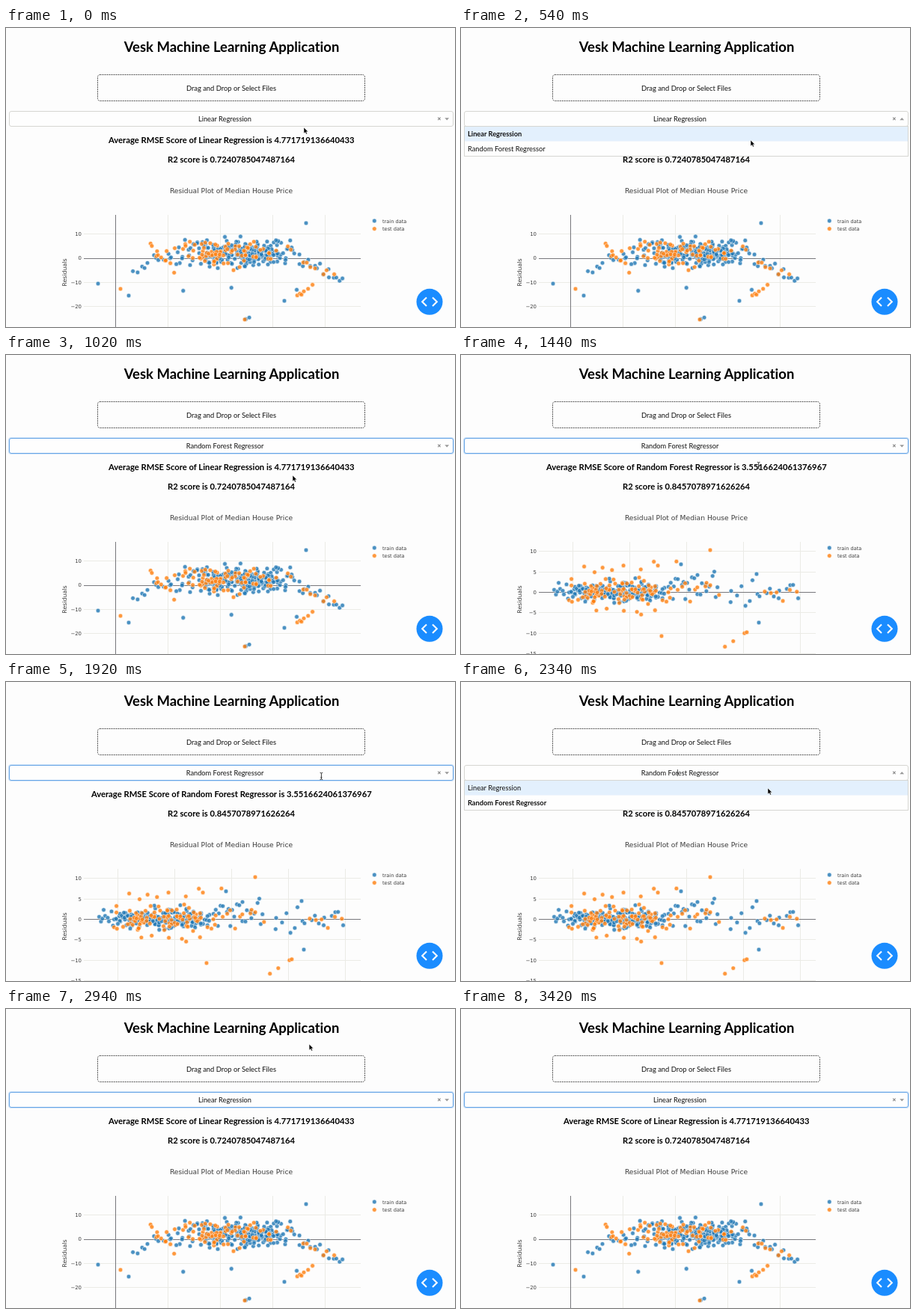
An HTML page that plays this animation: 600x400 px, repeating every 3480 ms.

```html
<!DOCTYPE html>
<html lang="en">
<head>
<meta charset="utf-8">
<title>Regression dashboard</title>
<style>
  html, body { margin: 0; width: 100%; height: 100%; overflow: hidden; background: #fdfdfd; }
  svg { display: block; width: 600px; height: 400px; }
  text { font: 9.25px Lato, sans-serif; font-variant-ligatures: none; fill: #111; }
  .mid { text-anchor: middle; }
  .bold { font-weight: 700; }
  .head { font-size: 18.5px; fill: #000; }
  .drop { font-size: 9.4px; }
  .score { font-size: 11.25px; fill: #000; }
  .plot text { font: 6.9px "DejaVu Sans", sans-serif; fill: #3c3c3c; }
  .plot .title { font-size: 9.2px; }
  .plot .axis { font-size: 7.9px; }
  .plot .key { font-size: 6.6px; }
  .tick { text-anchor: end; }
  .grid { stroke: #ebebe6; }
  .zero { stroke: #77777c; }
  .train { fill: #1f77b4; }
  .test { fill: #ff7f0e; }
  .plot circle { opacity: .8; stroke: #fff; stroke-width: .6; }
</style>
</head>
<body>
<svg viewBox="0 0 600 400">
  <defs><clipPath id="area"><rect x="104" y="250" width="370" height="150"/></clipPath></defs>
  <rect width="600" height="400" fill="#fdfdfd"/>

  <text class="mid bold head" x="301.5" y="32">Vesk Machine Learning Application</text>
  <rect x="122.5" y="62.5" width="357" height="35" rx="3" fill="none" stroke="#555" stroke-dasharray="2 1"/>
  <text class="mid drop" x="301" y="84">Drag and Drop or Select Files</text>

  <text class="mid bold score" id="rmse" x="301.3" y="154"></text>
  <text class="mid bold score" id="r2" x="301" y="179.5"></text>

  <g class="plot">
    <text class="mid title" x="301" y="221">Residual Plot of Median House Price</text>
    <text class="mid axis" transform="translate(81 327) rotate(-90)">Residuals</text>
    <g id="linear"></g>
    <g id="forest"></g>
    <circle class="train" cx="492.3" cy="258" r="2.9"/>
    <circle class="test" cx="492.3" cy="268.6" r="2.9"/>
    <text class="key" x="503" y="260.6">train data</text>
    <text class="key" x="503" y="271.2">test data</text>
  </g>

  <circle cx="566" cy="366.3" r="17.5" fill="#1a8cff"/>
  <path d="M562 360.6l-5.8 5.7 5.8 5.7M570 360.6l5.8 5.7-5.8 5.7" fill="none" stroke="#fff" stroke-width="2.1"/>

  <rect id="glow" x="4" y="111" width="594" height="21" rx="3" fill="none" stroke="#cfe3f8" stroke-width="2"/>
  <rect id="control" x="4.5" y="111.5" width="593" height="20" rx="2.5" fill="#fefefe"/>
  <text class="mid" id="choice" x="292.5" y="124.8"></text>
  <path d="M577.2 119.7l3.4 3.4m0-3.4l-3.4 3.4" stroke="#888" stroke-width="1.1"/>
  <path id="arrow" fill="#999"/>
  <g id="menu">
    <rect x="4.5" y="131.5" width="593" height="40" fill="#fefefe" stroke="#d6d6d2"/>
    <rect id="hover" x="5" width="592" height="19.5" fill="#e3f0fd"/>
    <text id="optLinear" x="9" y="145.3">Linear Regression</text>
    <text id="optForest" x="9" y="165.2">Random Forest Regressor</text>
  </g>
  <path id="caret" d="M289.5 117v9" stroke="#333" stroke-width=".8"/>

  <g id="pointer">
    <path id="tip" d="M0 0V8.1L1.9 6.4 3.1 9.1 4.5 8.5 3.3 5.8H5.7Z" fill="#000" stroke="#fff" stroke-width=".5"/>
    <path id="beam" d="M-1.8 -4.5Q0 -4.5 0 -3.3Q0 -4.5 1.8 -4.5M0 -3.3V3.5M-1.8 4.7Q0 4.7 0 3.5Q0 4.7 1.8 4.7M-1 1.8H1" fill="none" stroke="#222" stroke-width=".9"/>
  </g>
</svg>
<script>
const LOOP = 3480, STEP = 60;
const $ = id => document.getElementById(id);
const set = (node, attrs) => {
  for (const k in attrs) node.setAttribute(k, attrs[k]);
  return node;
};
const add = (parent, tag, attrs) =>
  parent.appendChild(set(document.createElementNS('http://www.w3.org/2000/svg', tag), attrs));
const show = (id, on) => { $(id).style.display = on ? '' : 'none'; };

let seed = 7;
function rnd() {
  seed = seed + 0x6D2B79F5 | 0;
  let v = Math.imul(seed ^ seed >>> 15, 1 | seed);
  v = v + Math.imul(v ^ v >>> 7, 61 | v) ^ v;
  return ((v ^ v >>> 14) >>> 0) / 4294967296;
}
const gauss = () => (rnd() + rnd() + rnd() - 1.5) * 2;
const many = (n, make) => Array.from({ length: n }, (_, i) => make(i));

// Round cloud, band of scattered points along a line, single point.
const bell = (n, x, y, sx, sy) => many(n, () => [x + gauss() * sx, y + gauss() * sy]);
const trail = (n, x0, y0, x1, y1, spread) => many(n, i => {
  const u = (i + rnd()) / n;
  return [x0 + (x1 - x0) * u, y0 + (y1 - y0) * u + gauss() * spread];
});
const dot = (x, y) => [[x, y]];

const plots = {
  linear: {
    left: 217, colGap: 70, zero: 308, rowGap: 32.4, unit: 10, top: 10, axis: 146,
    train: [
      bell(155, 296, 301, 32, 8.5), bell(70, 348, 299, 22, 8.5),
      trail(14, 168, 326, 238, 304, 6), trail(16, 385, 309, 452, 336, 6),
      trail(3, 220, 349, 400, 350, 3), trail(2, 314, 391, 330, 385, 1),
      dot(123, 342), dot(164, 358), dot(372, 365), dot(401, 261)
    ],
    test: [
      bell(80, 300, 301, 36, 8.5), trail(9, 190, 301, 225, 315, 9),
      trail(6, 385, 360, 411, 345, 1), trail(7, 390, 303, 442, 336, 4),
      dot(153, 349), dot(319, 390)
    ]
  },
  forest: {
    left: 150, colGap: 76, zero: 317.5, rowGap: 27.3, unit: 5, top: 10,
    train: [
      bell(85, 186, 317, 17, 5), bell(100, 236, 317, 18, 6.5),
      trail(20, 123, 315, 170, 317, 5), trail(24, 275, 313, 345, 313, 11),
      trail(18, 355, 308, 452, 324, 11),
      dot(294, 280), dot(395, 293), dot(398, 358)
    ],
    test: [
      bell(42, 183, 317, 17, 8), bell(48, 240, 317, 18, 8.5),
      trail(10, 142, 296, 290, 282, 6), trail(6, 170, 342, 272, 342, 2),
      trail(10, 285, 309, 345, 313, 9), trail(6, 400, 316, 450, 324, 12),
      trail(4, 348, 393, 390, 365, 1),
      dot(333, 261), dot(268, 376)
    ]
  }
};

function drawPlot(name) {
  const p = plots[name], root = $(name);
  const line = (d, cls) => add(root, 'path', { d, class: cls });

  for (let x = p.left; x < 474; x += p.colGap) line(`M${x - .5} 250V400`, 'grid');
  for (let v = p.top; ; v -= p.unit) {
    const y = p.zero - v / p.unit * p.rowGap;
    if (y > 400) break;
    line(`M104 ${Math.floor(y) + .5}H474`, v ? 'grid' : 'zero');
    add(root, 'text', { class: 'tick', x: 101, y: y + 2.4 }).textContent = String(v).replace('-', '−');
  }
  if (p.axis) line(`M${p.axis + .5} 250V400`, 'zero');

  const dots = add(root, 'g', { 'clip-path': 'url(#area)' });
  for (const kind of ['train', 'test']) {
    for (const [x, y] of p[kind].flat()) {
      add(dots, 'circle', { class: kind, cx: x.toFixed(1), cy: y.toFixed(1), r: 2.9 });
    }
  }
}
drawPlot('linear');
drawPlot('forest');

const models = {
  linear: { label: 'Linear Regression', rmse: '4.771719136640433', r2: '0.7240785047487164' },
  forest: { label: 'Random Forest Regressor', rmse: '3.5516624061376967', r2: '0.8457078971626264' }
};

// time, chosen model, fitted model, menu open
const states = [
  [0, 'linear', 'linear', false],
  [300, 'linear', 'linear', true],
  [960, 'forest', 'linear', false],
  [1380, 'forest', 'forest', false],
  [2100, 'forest', 'forest', true],
  [2400, 'linear', 'forest', false],
  [2460, 'linear', 'linear', false]
];

// time, x, y
const moves = [
  [0, 398, 133], [240, 393, 125], [540, 387, 150], [840, 383, 161], [1140, 383, 161],
  [1860, 422, 126], [2100, 418, 125], [2340, 410, 142], [2700, 410, 141],
  [3120, 402, -14], [LOOP, 402, -14]
];

function pointerAt(t) {
  const i = moves.findIndex(m => m[0] > t);
  const [t0, x0, y0] = moves[i - 1], [t1, x1, y1] = moves[i];
  const u = (t - t0) / (t1 - t0), k = u * u * (3 - 2 * u);
  return [x0 + (x1 - x0) * k, y0 + (y1 - y0) * k];
}

function render(time) {
  const t = Math.floor(time % LOOP / STEP) * STEP;
  const [, chosen, fitted, open] = states.filter(s => s[0] <= t).pop();
  const focused = t >= 300 && !open;
  const model = models[fitted];
  const [x, y] = pointerAt(t);

  $('choice').textContent = models[chosen].label;
  $('rmse').textContent = `Average RMSE Score of ${model.label} is ${model.rmse}`;
  $('r2').textContent = `R2 score is ${model.r2}`;
  show('linear', fitted === 'linear');
  show('forest', fitted === 'forest');

  show('menu', open);
  show('glow', focused);
  show('caret', open && chosen === 'forest');
  set($('control'), { stroke: focused ? '#66a5e6' : '#d6d6d2' });
  set($('arrow'), { d: open ? 'M586.3 123.3h5.8l-2.9-3.2z' : 'M586.3 120.3h5.8l-2.9 3.2z' });
  set($('hover'), { y: y > 152 ? 151.5 : 132 });
  set($('optLinear'), { class: chosen === 'linear' ? 'bold' : '' });
  set($('optForest'), { class: chosen === 'forest' ? 'bold' : '' });

  const beam = (y > 111 && y < 132) || (!open && y > 138 && y < 157);
  show('beam', beam);
  show('tip', !beam);
  set($('pointer'), { transform: `translate(${x.toFixed(1)} ${y.toFixed(1)})` });
}

const start = performance.now();
function tick(now) {
  render(Math.max(0, now - start));
  requestAnimationFrame(tick);
}
render(0);
requestAnimationFrame(tick);
</script>
</body>
</html>
```
